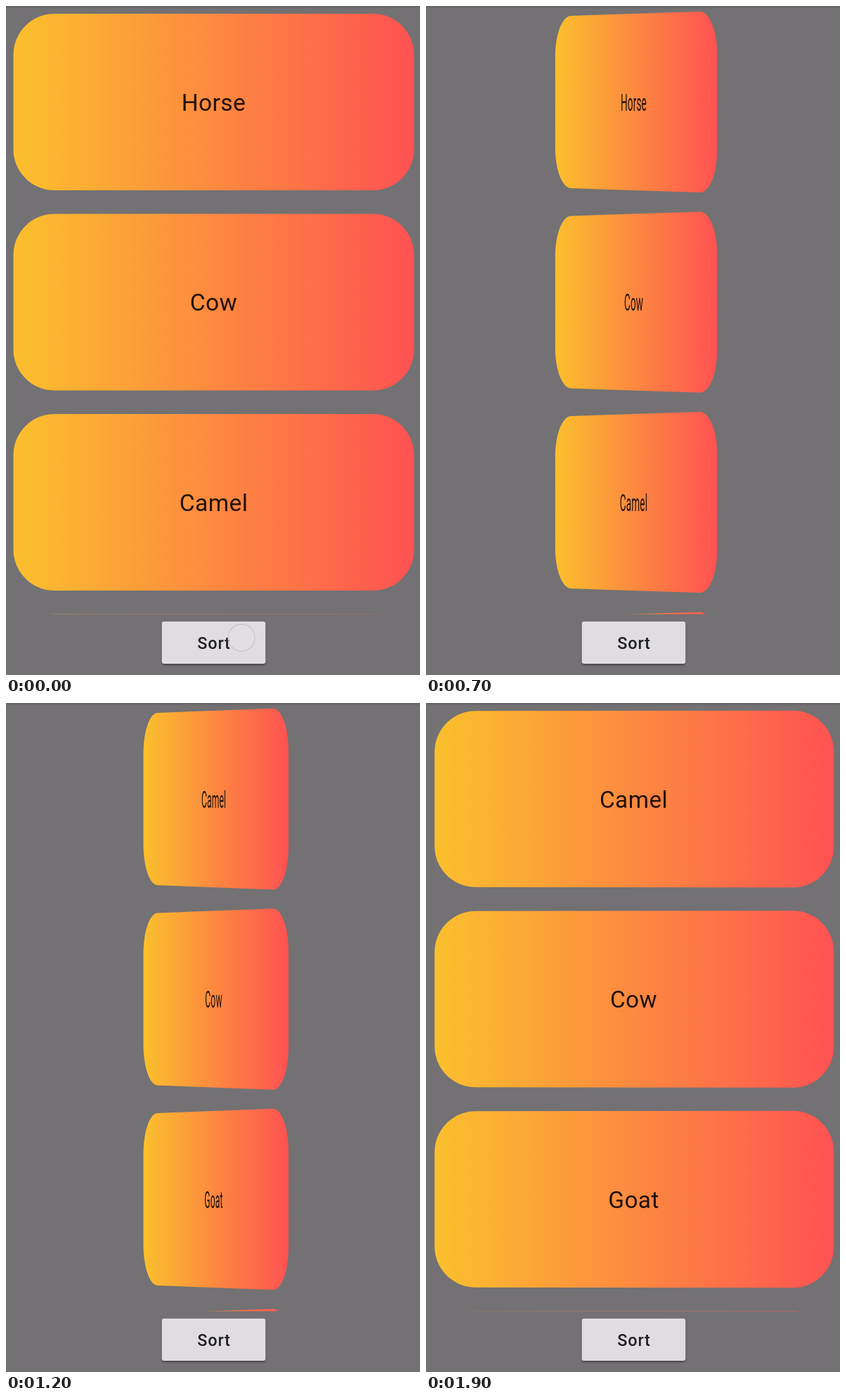
An HTML page that plays this animation: 589x951 px, repeating every 2 s.

```html
<!DOCTYPE html>
<html lang="en">
<head>
<meta charset="utf-8">
<title>Sort cards</title>
<style>
  html, body { margin: 0; width: 100%; height: 100%; overflow: hidden; background: #737173; }
  svg { display: block; width: 100vw; height: 100vh; }
  text { font-family: Roboto, sans-serif; text-anchor: middle; }
  .label { font-size: 33.5px; letter-spacing: .42px; fill: #000; fill-opacity: .87; }
  .button { font-size: 23.4px; font-weight: 500; letter-spacing: .9px; fill: #212021; }
</style>
</head>
<body>
<svg viewBox="0 0 589 951">
  <defs>
    <linearGradient id="fill" gradientUnits="userSpaceOnUse" y1="0" y2="0">
      <stop offset="0" stop-color="#fbc02d"/>
      <stop id="mid" offset=".5" stop-color="#fd8940"/>
      <stop offset="1" stop-color="#ff5252"/>
    </linearGradient>
    <linearGradient id="shade" x2="0" y2="1">
      <stop offset="0" stop-color="#000" stop-opacity=".14"/>
      <stop offset="1" stop-color="#000" stop-opacity="0"/>
    </linearGradient>
    <clipPath id="list"><rect width="589" height="864.6"/></clipPath>
    <filter id="blur" x="-10%" y="-20%" width="120%" height="140%"><feGaussianBlur stdDeviation="1.6"/></filter>
  </defs>
  <rect width="589" height="951" fill="#737173"/>
  <g id="cards" clip-path="url(#list)"></g>
  <rect width="589" height="4" fill="url(#shade)"/>
  <rect x="222" y="877" width="147" height="60" rx="3.3" fill="#000" opacity=".4" filter="url(#blur)"/>
  <rect x="221.7" y="875" width="147.5" height="60" rx="3.3" fill="#dfdde0"/>
  <text class="button" x="296" y="913.5">Sort</text>
  <circle id="touch" cx="335" cy="898" r="19" fill="#e4e2e5" fill-opacity=".5" stroke="#c9c7d2" stroke-width="1.3"/>
</svg>
<script>
const LOOP = 2000, STEP = 100, SWAP = 950;
const CX = 295.5, TOP = 136.5, PITCH = 284.5;
const HALF_W = 285, HALF_H = 125.5, RADIUS = 58.5, DEPTH = 285 / 0.033;
const before = ['Horse', 'Cow', 'Camel', ''];
const after = ['Camel', 'Cow', 'Goat', ''];

// [time in ms, tilt in degrees]
const tilt = [[0, 0], [100, 13], [300, 33.1], [600, 56.7], [700, 66.2], [900, 87.3],
  [1000, 85.8], [1200, 68.8], [1400, 50.8], [1800, 11.2], [1900, 4.8], [2000, 0]];

const $ = id => document.getElementById(id);
const make = (tag, parent) =>
  parent.appendChild(document.createElementNS('http://www.w3.org/2000/svg', tag));

const cards = before.map(() => {
  const shape = make('path', $('cards'));
  const label = make('text', $('cards'));
  shape.setAttribute('fill', 'url(#fill)');
  label.setAttribute('class', 'label');
  return { shape, label };
});

// Rounded rectangle as points around its centre
const outline = [];
[[1, 1], [-1, 1], [-1, -1], [1, -1]].forEach(([sx, sy], corner) => {
  for (let i = 0; i <= 24; i++) {
    const a = (corner + i / 24) * Math.PI / 2;
    outline.push([sx * (HALF_W - RADIUS) + RADIUS * Math.cos(a),
                  sy * (HALF_H - RADIUS) + RADIUS * Math.sin(a)]);
  }
});

function angleAt(t) {
  const i = tilt.findIndex(key => key[0] > t);
  const [t0, a0] = tilt[i - 1], [t1, a1] = tilt[i];
  return (a0 + (a1 - a0) * (t - t0) / (t1 - t0)) * Math.PI / 180;
}

function render(t) {
  const angle = angleAt(t), cos = Math.cos(angle), sin = Math.sin(angle);
  const project = (x, y, cy) => {
    const w = 1 - x * sin / DEPTH;
    return [CX + x * cos / w, cy + y / w];
  };
  const left = project(-HALF_W, 0, 0)[0], right = project(HALF_W, 0, 0)[0];
  $('fill').setAttribute('x1', left);
  $('fill').setAttribute('x2', right);
  $('mid').setAttribute('offset', (CX - left) / (right - left));

  const names = t < SWAP ? before : after;
  cards.forEach(({ shape, label }, i) => {
    const cy = TOP + i * PITCH;
    const points = outline.map(([x, y]) => project(x, y, cy).map(v => v.toFixed(2)).join(' '));
    shape.setAttribute('d', 'M' + points.join('L') + 'Z');
    label.setAttribute('transform', `translate(${CX} ${cy + 12.2}) scale(${cos} 1)`);
    if (label.textContent !== names[i]) label.textContent = names[i];
  });
  $('touch').style.display = t < STEP ? '' : 'none';
}

const start = performance.now();
function tick() {
  const t = (performance.now() - start) % LOOP;
  render(Math.floor(t / STEP) * STEP);
  requestAnimationFrame(tick);
}
tick();
</script>
</body>
</html>
```
